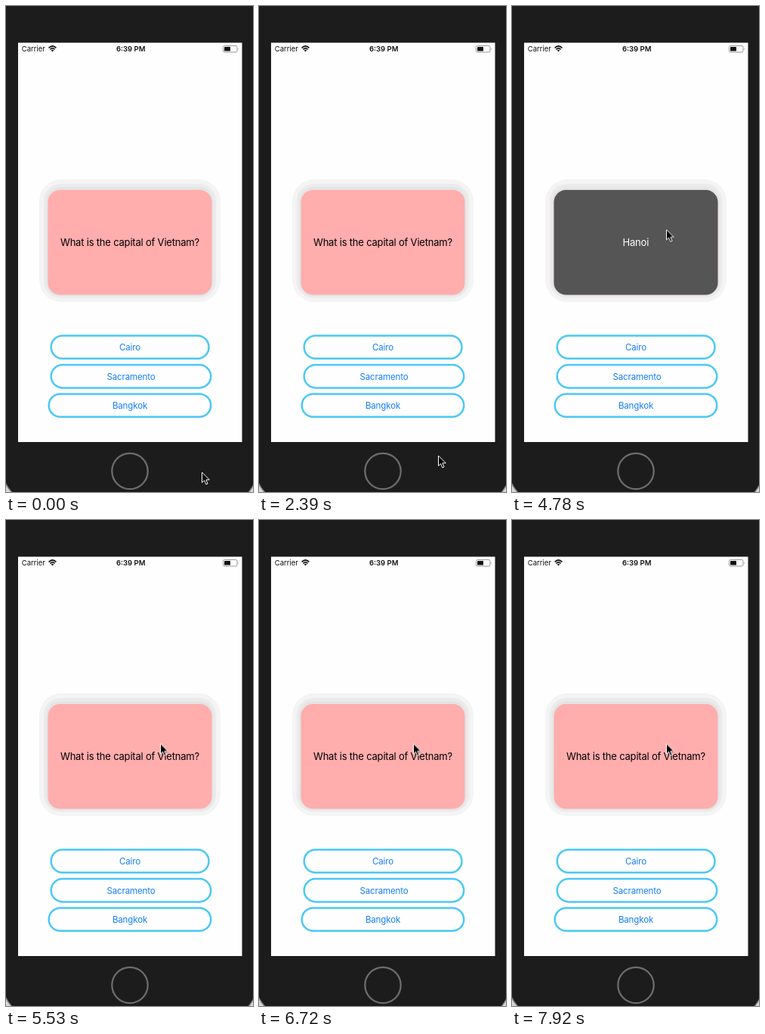
Recreate the animation shown at these times as an HTML page. Size 327 px wide and 642 px high, loop 8 s.

```html
<!DOCTYPE html>
<html lang="en">
<head>
<meta charset="utf-8">
<title>Flash card</title>
<style>
  html, body { margin: 0; width: 100%; height: 100%; overflow: hidden; background: #1c1c1c; }
  svg { display: block; width: 327px; height: 642px; }
  text { font-family: Inter, Roboto, "Liberation Sans", sans-serif; }
  .mid { text-anchor: middle; }
  .label { font-size: 13px; letter-spacing: -.2px; }
  .buttons text { font-size: 11.5px; letter-spacing: -.12px; fill: #157efb; }
  .buttons rect { fill: none; stroke: #4bc8f5; stroke-width: 2.5; }
  .status { font-size: 9.5px; fill: #111; }
  .back { visibility: hidden; animation: flip 8s step-end infinite; }
  .cursor {
    filter: drop-shadow(0 1px .7px rgba(0, 0, 0, .35));
    animation: move 8s step-end infinite;
  }

  @keyframes flip {
    0%, 69.125%, 84%, 99%, 100% { visibility: hidden; }
    59.75%, 74.625%, 93.375% { visibility: visible; }
  }
  @keyframes move {
    0% { transform: translate(259px, 615px); }
    13.125% { transform: translate(259px, 616px); }
    15% { transform: translate(256px, 616px); }
    16.875% { transform: translate(243px, 605px); }
    18.625% { transform: translate(240px, 602px); }
    20.5% { transform: translate(240px, 601px); }
    22.375% { transform: translate(243px, 604px); }
    24.25% { transform: translate(243px, 605px); }
    29.875% { transform: translate(237px, 593px); }
    35.375% { transform: translate(239px, 593px); }
    37.25% { transform: translate(283px, 396px); }
    39.125% { transform: translate(249px, 279px); }
    41% { transform: translate(209px, 291px); }
    42.875%, 100% { transform: translate(204px, 294.5px); }
  }
</style>
</head>
<body>
<svg viewBox="0 0 327 642">
  <!-- phone -->
  <rect width="327" height="642" fill="#1c1c1c"/>
  <g fill="#d8d8d8" stroke="#8a8a8a" stroke-width="1.5">
    <path d="M-2 627Q1 636 9 644H-2Z"/>
    <path d="M329 630Q326 637 320 644H329Z"/>
  </g>
  <rect x="16" y="48.5" width="296.5" height="527.5" fill="#fefefe"/>
  <circle cx="164" cy="614.5" r="23.7" fill="none" stroke="#6c6c6c" stroke-width="2.3"/>

  <!-- status bar -->
  <text class="status" x="20.8" y="60">Carrier</text>
  <g fill="none" stroke="#111" stroke-width="1.7">
    <path d="M56.6 55.3Q61.5 50.7 66.4 55.3"/>
    <path d="M58.4 57.3Q61.5 54.5 64.6 57.3"/>
  </g>
  <path d="M59.7 58.5Q61.5 57 63.3 58.5L61.5 60.4Z" fill="#111"/>
  <text class="status mid" x="165.2" y="60" font-weight="600">6:39 PM</text>
  <rect x="287.5" y="52.5" width="18.5" height="8.5" rx="2" fill="none" stroke="#999"/>
  <rect x="289" y="54" width="8" height="5.5" rx=".6" fill="#111"/>
  <path d="M307 55.3Q308.4 56.7 307 58.2Z" fill="#888"/>

  <!-- card -->
  <rect x="44" y="229" width="240" height="162" rx="29" fill="#f4f4f4"/>
  <rect x="50" y="235" width="228" height="150.5" rx="22" fill="#ebebeb"/>
  <rect x="53.5" y="239.5" width="221" height="143.5" rx="18" fill="#e4e4e4"/>
  <rect x="55.5" y="243" width="217" height="138.5" rx="16" fill="#ffadad"/>
  <text class="label mid" x="164" y="317">What is the capital of Vietnam?</text>
  <g class="back">
    <rect x="55.5" y="243" width="217" height="138.5" rx="16" fill="#555"/>
    <text class="label mid" x="163.8" y="317" fill="#fff">Hanoi</text>
  </g>

  <!-- answers -->
  <g class="buttons mid">
    <rect x="59.7" y="435.5" width="208.8" height="30.3" rx="15.1"/>
    <text x="164" y="455">Cairo</text>
    <rect x="59.7" y="474.1" width="211.5" height="30.3" rx="15.1"/>
    <text x="165.5" y="493.7">Sacramento</text>
    <rect x="56.7" y="512.5" width="214.5" height="30.3" rx="15.1"/>
    <text x="164" y="532">Bangkok</text>
  </g>

  <g class="cursor">
    <path d="M.5 1V14.5L3.6 11.7L5.9 17L8.1 16L5.8 10.9H10.3Z" fill="#000" stroke="#fff"/>
  </g>
</svg>
</body>
</html>
```
